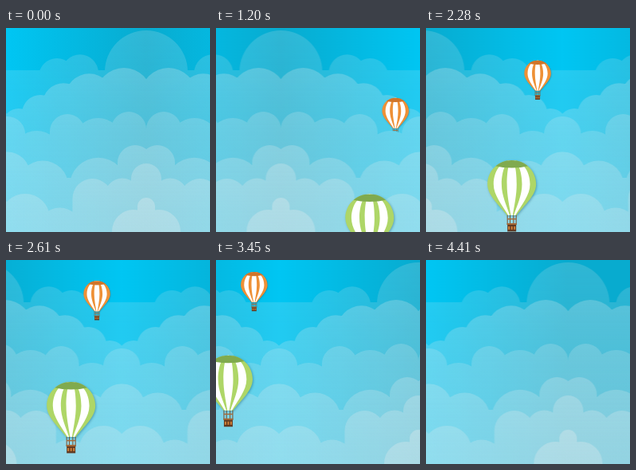
Recreate the animation shown at these times as an HTML page with a canvas. Size 256 by 256 pixels, loop 4.44 s.

```html
<!DOCTYPE html>
<html lang="en">
<head>
<meta charset="utf-8">
<title>Balloons over clouds</title>
<style>
  html, body { margin: 0; width: 100%; height: 100%; overflow: hidden; background: #19bde2; }
  canvas { display: block; width: 256px; height: 256px; }
</style>
</head>
<body>
<canvas id="stage" width="256" height="256"></canvas>
<script>
const SIZE = 256, PERIOD = 350, CENTER = 176, LOOP = 4440, STEP = 30;
const ctx = document.getElementById('stage').getContext('2d');

// Cloud banks from back to front. Each is mirrored about CENTER:
// puff(i) gives the distance from the axis, the top and the radius.
const odd = i => i % 2;
const banks = [
  { base: 53, alpha: .16, count: 3, puff: i => {
    const k = (i / 2) ** .43;
    return [112 * k, 3 + 35 * Math.sqrt(k), i ? 23 : 52];
  } },
  { base: 108, alpha: .22, count: 5, puff: i => {
    const k = i / 4;
    return [28 + 132 * k ** .8, 50 + 51 * k ** 1.4, 35 * .87 ** i];
  } },
  { base: 150, alpha: .18, count: 5, puff: i =>
    [22 + 38.5 * i, 105 + i * (1.5 + 6.5 * odd(i)), 22 + 9 * odd(i)] },
  { base: 188, alpha: .22, count: 4, puff: i =>
    [14 + 54 * i - 9 * Math.sin(i * Math.PI * 2 / 3), 147 + 20 * Math.sin(i * .9), i ? 40 - 4 * i : 22] },
  { base: 236, alpha: .25, count: 5, puff: i =>
    [152 * (i / 4) ** 1.17, 170 + i * (9.5 + 9 * odd(i)), 19 + 3 * i] },
  { base: SIZE, alpha: .3, count: 2, puff: i => [16 * i, 213 + 15 * i, 11 + 16 * i] }
];

const balloons = {
  orange: { x: 319.8, scale: .55, body: '#ee9036', cap: '#d0752a',
            top: t => Math.max(15, 140.3 - .0437 * t) },
  green: { x: 287.4, scale: 1, body: '#aed667', cap: '#80aa4e',
           top: t => 256 - .0395 * t }
};

function makeStrip(draw) {
  const strip = document.createElement('canvas');
  strip.width = PERIOD + SIZE + 2;
  strip.height = SIZE;
  draw(strip.getContext('2d'), strip.width);
  return strip;
}

function paintSky(c, width) {
  const g = c.createLinearGradient(CENTER - PERIOD, 0, CENTER + PERIOD, 0);
  for (let i = 0; i <= 4; i++) g.addColorStop(i / 4, odd(i) ? '#00c6f3' : '#08abcf');
  c.fillStyle = g;
  c.fillRect(0, 0, width, SIZE);
}

function bankShape(bank, width) {
  const shape = new Path2D();
  shape.rect(-5, bank.base, width + 10, SIZE);
  const addPuff = (x, top, r) => {
    shape.moveTo(x + r, top + r);
    shape.arc(x, top + r, r, 0, Math.PI * 2);
    shape.rect(x - r, top + r, r * 2, SIZE);
  };
  for (let axis = CENTER - PERIOD; axis < width + PERIOD; axis += PERIOD) {
    for (let i = 0; i < bank.count; i++) {
      const [dx, top, r] = bank.puff(i);
      addPuff(axis - dx, top, r);
      addPuff(axis + dx, top, r);
    }
  }
  return shape;
}

function paintBank(c, width, bank) {
  const peak = bank.puff(0)[1];
  const haze = strength => `rgba(228,236,238,${bank.alpha * strength})`;
  const g = c.createLinearGradient(0, peak, 0, peak + 80);
  g.addColorStop(0, haze(1.15));
  g.addColorStop(1, haze(.9));
  c.fillStyle = g;
  c.filter = 'blur(.5px)';
  c.fill(bankShape(bank, width));
  c.filter = 'none';
}

const scene = makeStrip((c, w) => {
  paintSky(c, w);
  banks.forEach(b => paintBank(c, w, b));
});

// The same scene cut to the third bank, so a balloon can rise from behind it.
const foreground = makeStrip((c, w) => {
  c.fill(bankShape(banks[2], w));
  c.globalCompositeOperation = 'source-in';
  c.drawImage(scene, 0, 0);
});

const envelope = new Path2D(
  'M0 0C17 0 30.5 13 30.5 30C30.5 44 16 56 6 69L-6 69C-16 56 -30.5 44 -30.5 30C-30.5 13 -17 0 0 0Z');

function box(color, x, y, w, h) {
  ctx.fillStyle = color;
  ctx.fillRect(x, y, w, h);
}

function drawBasket() {
  ctx.strokeStyle = '#79502f';
  ctx.lineWidth = 1;
  ctx.beginPath();
  for (const k of [-1, -.4, .4, 1]) {
    ctx.moveTo(5.5 * k, 68);
    ctx.lineTo(5.5 * k, 81);
  }
  ctx.stroke();
  box('#a76a38', -5.5, 73, 11, 1.5);
  box('#613a22', -5.5, 80, 11, 9.5);
  box('#a56a38', -6, 79, 12, 2);
  for (let x = -4.5; x < 4; x += 3.5) box('#d08139', x, 83, 2, 4);
}

function drawBalloon(b, t, offset) {
  ctx.save();
  ctx.translate(b.x - offset, b.top(t));
  ctx.scale(b.scale, b.scale);
  drawBasket();

  ctx.save();
  ctx.shadowColor = 'rgba(0,60,80,.35)';
  ctx.shadowBlur = 3 * b.scale;
  ctx.shadowOffsetX = ctx.shadowOffsetY = b.scale;
  ctx.fillStyle = b.body;
  ctx.fill(envelope);
  ctx.restore();

  // Nested narrower envelopes leave the vertical stripes.
  for (const [width, color] of [[.75, '#fff'], [.42, b.body], [.2, '#fff']]) {
    ctx.save();
    ctx.scale(width, 1);
    ctx.fillStyle = color;
    ctx.fill(envelope);
    ctx.restore();
  }

  ctx.save();
  ctx.clip(envelope);
  ctx.fillStyle = b.cap;
  ctx.beginPath();
  ctx.moveTo(-32, 0);
  ctx.lineTo(32, 0);
  ctx.lineTo(22, 7);
  ctx.quadraticCurveTo(0, 12, -22, 7);
  ctx.fill();
  ctx.restore();
  ctx.restore();
}

function render(now) {
  const t = Math.floor(now % LOOP / STEP) * STEP;
  const offset = t / LOOP * PERIOD;
  ctx.drawImage(scene, -offset, 0);
  drawBalloon(balloons.orange, t, offset);
  ctx.drawImage(foreground, -offset, 0);
  drawBalloon(balloons.green, t, offset);
}

const start = performance.now();
function tick() {
  render(performance.now() - start);
  requestAnimationFrame(tick);
}
tick();
</script>
</body>
</html>
```
